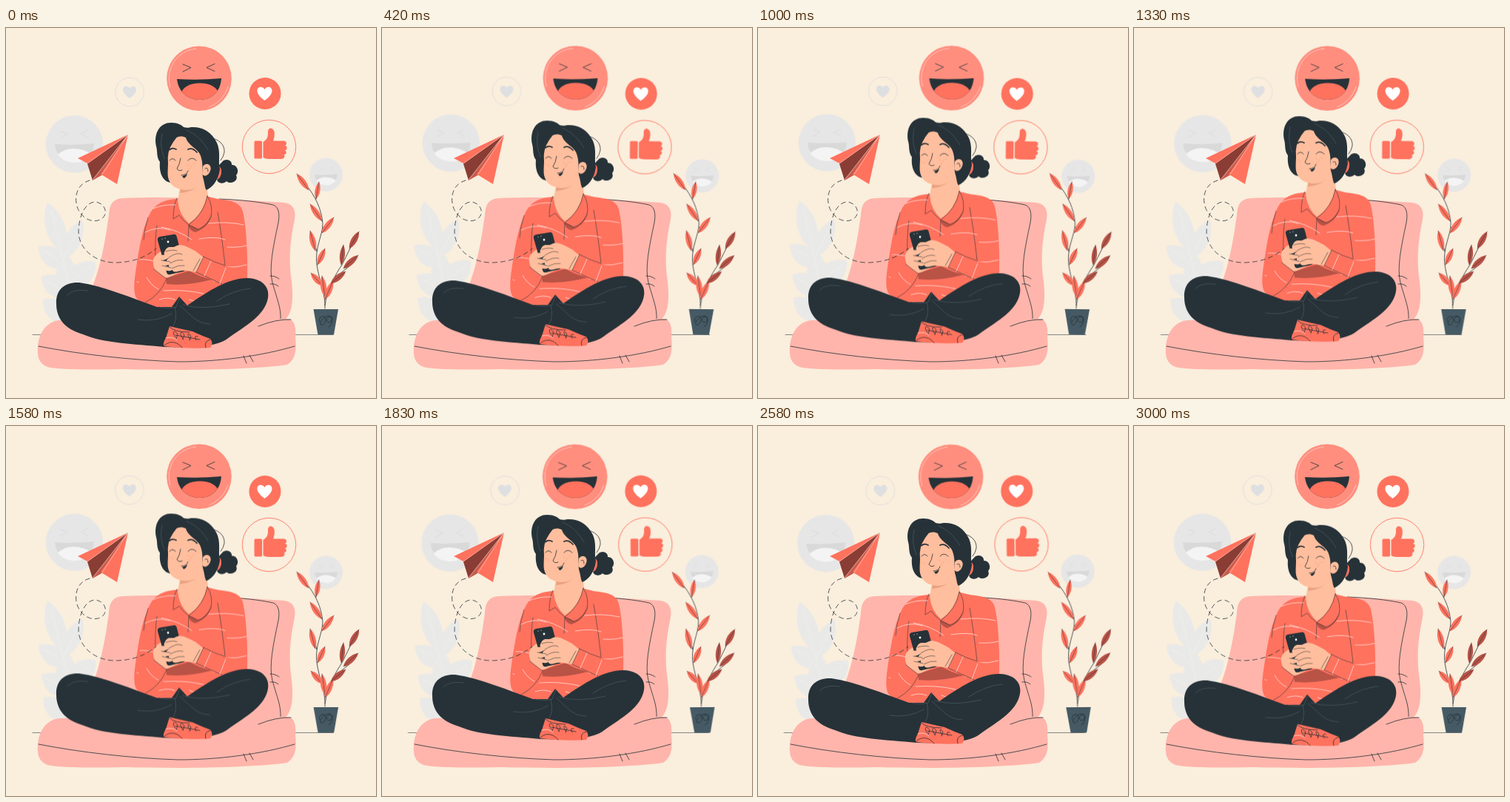
These frames come from a looping animation (500 px wide and 500 px high, 3.04 s). An HTML page:

```html
<!DOCTYPE html>
<html lang="en">
<head>
<meta charset="utf-8">
<title>Chatting on the sofa</title>
<style>
html, body { margin: 0; width: 100%; height: 100%; overflow: hidden; background: #faeedd; }
svg { display: block; width: 100vw; height: 100vh; }
.wind { animation: wind 3040ms linear infinite; }
#backdrop { transform-origin: 252px 230px; }
#reactions { transform-origin: 304px 111px; }
#plant { transform-origin: 434px 306px; }
#person { animation: float 3040ms linear infinite; }
#floor { animation: slide 3040ms linear infinite; }
@keyframes wind { 25% { transform: rotate(1deg); } 75% { transform: rotate(-1deg); } }
@keyframes float { 50% { transform: translateY(-10px); } }
@keyframes slide { 25% { transform: translateX(1.5px); } 75% { transform: translateX(-1.5px); } }
.ink { fill: none; stroke: #263238; stroke-width: .8; stroke-linecap: round; stroke-linejoin: round; }
.thin { stroke-width: .55; }
.stripe { fill: none; stroke: #ffd3cb; stroke-width: .9; stroke-linecap: round; }
.seam { fill: none; stroke: #52626a; stroke-width: .6; stroke-linecap: round; }
.coral { fill: #ff725e; }
.dark { fill: #263238; }
.skin { fill: #ffbe9d; }
</style>
</head>
<body>
<svg viewBox="0 0 500 500">
  <defs>
    <path id="heart" d="M0 9C-4 6-10 1-10-4C-10-10-3-11 0-6C3-11 10-10 10-4C10 1 4 6 0 9Z"/>
    <clipPath id="grin"><path d="M231 69Q261 71 291 68C290 86 278 97 262 97C245 97 233 86 231 69Z"/></clipPath>
  </defs>

  <g id="backdrop" class="wind">
    <g id="grayLeaves" fill="#e9e9e8"></g>
    <path d="M61 246Q70 280 77 312T94 388M99 270Q88 290 78 312M51 302Q70 309 79 325M114 323Q93 337 84 350M54 341Q74 350 87 367" fill="none" stroke="#f3f1ed" stroke-width=".7"/>
    <circle cx="167" cy="86.5" r="19.3" fill="none" stroke="#dedfde" stroke-width=".9"/>
    <use href="#heart" transform="translate(167 87) scale(.9)" fill="#dedfe0"/>
    <g id="grayFace">
      <circle cx="92.5" cy="157" r="38.7" fill="#e6e6e6"/>
      <path d="M66 157Q92 159 119 156C118 173 106 182 93 182C78 182 68 172 66 157Z" fill="#d9d9d9"/>
      <path d="M70 171Q80 162 93 163T115 170C110 178 102 182 93 182C83 182 75 178 70 171Z" fill="#f4f4f4"/>
      <path d="M73 139L83 143L73 149M111 138L101 143L111 148" fill="none" stroke="#d8d8d8" stroke-width=".8"/>
    </g>
    <use href="#grayFace" transform="translate(378.7 106.7) scale(.582)"/>
  </g>

  <path id="floor" class="ink thin" d="M36 414.5H442"/>

  <g id="plant" class="wind">
    <path class="ink" d="M431 379C432 360 424 345 420 320C417 296 428 281 428 264C426 243 418 228 405 211M431 375C434 352 446 332 454 320C461 306 468 292 474 279M443 341Q452 330 464 322M421 319L427 307M428 270L437 263M427 260L416 247M419 231L422 216M420 302L416 287M431 365L437 354M426 348L418 338"/>
    <g id="redLeaves"></g>
    <path d="M415.500 380H449L443 414.500H421.500Z" fill="#455a64"/>
    <path class="ink" d="M424 397C421 389 432 387 432 394C431 403 423 403 425 398C428 391 436 386 440 391C442 398 435 400 433 395C433 390 440 388 441 393Q441 401 436 404"/>
  </g>

  <g id="reactions" class="wind">
    <circle cx="261" cy="68.300" r="43.800" fill="#ff8e7e"/>
    <path d="M222 80C215 54 231 31 257 28M300 79C296 93 285 103 274 107" fill="none" stroke="#ffd0c7" stroke-width=".8"/>
    <g clip-path="url(#grin)">
      <path class="dark" d="M225 60H298V100H225Z"/>
      <ellipse class="coral" cx="262" cy="89" rx="25" ry="14.500"/>
    </g>
    <path class="ink" d="M239 49L250 53.500L239 59M282 48.500L271 53.500L282 58.500"/>
    <circle class="coral" cx="350" cy="88.500" r="21.500"/>
    <use href="#heart" transform="translate(349.500 89)" fill="#fff"/>
    <circle cx="355.500" cy="160.500" r="36.200" fill="none" stroke="#ff725e" stroke-width=".9"/>
    <path class="coral" d="M337 152.500H344.500Q346 152.500 346 154V175Q346 176.500 344.500 176.500H337Q335.500 176.500 335.500 175V154Q335.500 152.500 337 152.500ZM347.500 154C354 150 354 146 354 140C354 134 361 134 362.500 140C363.500 145 362 150 361 152.500H375C380 152.500 380 158 377 159C381 160 380 165 377 165.500C380 167 379 171 375.500 171.500C378 174 375 177 372 177H355Q350 177 347.500 175Z"/>
  </g>

  <g id="sofa">
    <path fill="#ffb5ab" d="M116 352C128 322 134 289 139 253C140 237 145 231 158 230C220 227 305 231 376 236C389 238 392 247 390 259C383 291 382 316 386 343C389 371 386 389 374 397H110Z"/>
    <path class="ink" d="M288 231C316 232 343 235 361 239C369 242 370 252 368 263C361 296 355 324 360 344C366 366 372 378 371 394M357 335Q364 335 369 339M357 346Q364 345 368 349"/>
    <path fill="#ffb5ab" d="M43 430C45 412 54 397 72 395Q200 389 382 393C390 395 392 404 391 418C393 436 391 448 380 455C330 462 240 463 160 461C112 462 73 462 56 458C44 453 42 444 43 430Z"/>
    <path class="ink" d="M44 430C100 441 169 449 233 451C289 451 346 443 390 430M321 443L325 453M329 442L334 451M341 403Q366 393 385 394"/>
  </g>

  <g id="plane">
    <path class="coral" d="M165 144L97 176L112 184Z"/>
    <path fill="#8a3d34" d="M165 144L110 183.500L117 206Z"/>
    <path fill="#c95a4b" d="M165 144L117 206L131 198Z"/>
    <path class="coral" d="M165 144L128 197.500L150 211Z"/>
    <path d="M165 144L110 183M165 144L117 205M165 144L130 198" fill="none" stroke="#ffd0c7" stroke-width=".6"/>
  </g>

  <g id="person">
    <path class="dark" d="M292 181C297 175 306 179 305 185C312 184 316 194 311 199C315 207 303 212 298 207C292 213 282 208 286 201C282 197 284 188 292 181Z"/>
    <path class="ink" d="M275 148C288 150 296 158 295 168Q294 174 290 179"/>
    <path class="coral" d="M286 187Q292 187 291 196Q290 203 285 205Z"/>
    <path class="dark" d="M203 160C199 141 209 127 224 128C232 128 238 131 242 136C257 131 273 136 282 150C292 164 286 180 289 190C288 203 280 216 270 219C262 214 255 206 222 209C209 206 207 191 208 181C203 175 205 166 203 160Z"/>

    <path class="coral" d="M229 231C210 233 200 239 193 254C184 274 181 292 177 317C174 337 170 359 178 367C185 374 193 374 200 378H290L326 342C327 310 325 269 320 248C317 235 303 233 286 231L270 227Z"/>
    <path class="skin" d="M236 210L232 234Q234 252 247 264Q266 252 273 232L271 196Z"/>
    <path d="M236 217Q254 216 265 205Q257 221 235 223Z" fill="#eaa181"/>
    <path class="skin" d="M218 164C219 154 227 147 238 146C253 149 265 165 269 185L267 205C259 218 246 221 236 218C222 215 218 205 218 191Z"/>
    <path class="dark" d="M221 150C228 145 237 145 243 148C246 160 262 163 264 176C267 186 264 197 267 205C269 214 269 217 271 219C285 210 286 190 280 165C272 140 246 129 222 136ZM216 154Q223 148 232 146L226 154Q217 167 219 183L218 208Q208 199 208 181Z"/>
    <path class="skin" d="M266 187C271 180 279 185 276 193C273 201 267 201 265 197Z"/>
    <path d="M221 164.500Q225 161 230 164M246 164Q252 161 258 168" fill="none" stroke="#263238" stroke-width="1.700" stroke-linecap="round"/>
    <path class="ink" d="M221 179Q225 174 229 179M246 179Q251 173 257 179M236 176Q235 184 231 190Q233 194 238 192M237 199Q244 199 246 193M269 190Q273 187 273 194"/>
    <path class="dark" d="M238 200Q243 199 245 196Q244 202 240 203Z"/>
    <g fill="#f38c6c">
      <circle cx="246" cy="185" r=".6"/><circle cx="250" cy="187" r=".6"/><circle cx="254" cy="184" r=".6"/>
      <circle cx="222" cy="187" r=".6"/><circle cx="225" cy="189" r=".6"/><circle cx="248" cy="190" r=".6"/>
    </g>
    <path class="seam" d="M244 138C257 144 265 151 273 165M211 143Q207 160 214 177"/>

    <path fill="#b85346" d="M246 266Q258 270 277 252Q275 269 256 276Q248 274 246 266Z"/>
    <path class="coral" d="M231 230Q226 239 226 258L234 253L246 267Q233 251 232 235ZM272 225Q267 251 247 265L260 272Q277 264 279 241Z"/>
    <path class="ink thin" d="M231 230Q226 240 226 258L234 253Q239 260 247 266Q268 250 272 227Q280 239 277 256Q270 269 259 272L247 266L246 288M204 267Q201 286 202 313M286 249Q291 276 296 320M192 256Q187 271 186 286"/>
    <path class="stripe" d="M199 244Q213 238 229 239M188 276Q205 267 222 273M181 313Q190 312 204 316M177 343Q189 349 201 345M210 269Q233 273 251 286M274 264Q299 261 321 266M261 285Q284 281 296 286M299 296Q314 297 325 294M298 323Q312 324 325 320M280 342Q297 338 313 338M213 355Q242 353 267 359M207 367Q218 363 228 367M248 367L269 374"/>
    <path fill="#b85346" d="M216 338L248 328Q258 335 278 340Q243 349 217 346Z"/>

    <path class="skin" d="M199 319C197 309 205 304 213 300L234 300L241 327L224 335C213 342 201 333 199 319Z"/>
    <path class="dark" d="M208 282L226 279Q230 278 231 283L242 325Q243 328 239 329L222 333Q218 334 217 330L205 287Q204 283 208 282Z"/>
    <g fill="#fff"><circle cx="219" cy="289" r="1.400"/><circle cx="211" cy="285" r=".6"/><circle cx="215" cy="284" r=".6"/></g>
    <path class="skin" d="M215 301C219 293 224 298 229 295C237 290 247 297 257 302L268 311L259 330C248 329 242 326 232 329C226 331 223 327 226 324C220 326 218 321 222 318C216 319 215 314 220 311C214 309 212 305 215 301Z"/>
    <path class="skin" d="M200 314Q211 302 219 309Q221 312 211 314L224 316Q226 320 215 321L226 325Q225 330 212 327L204 328Z"/>
    <path class="ink thin" d="M220 310Q232 302 238 306M222 318Q231 312 239 314M226 324Q233 320 241 321M216 302Q225 299 231 301M210 314L222 316M211 321L223 324"/>
    <path class="coral" d="M267 309C282 317 297 323 316 326L325 338Q311 354 288 345L257 330Z"/>
    <path class="coral" d="M200 326L217 339Q209 361 188 372Q174 368 175 349Q184 337 200 326Z"/>
    <path class="ink thin" d="M267 309L257 330L292 346M267 309Q282 317 296 321M200 326L217 339Q208 361 188 371M262 312L253 328"/>
    <path class="stripe" d="M277 315L268 335M297 324L289 345M190 337Q196 348 206 353"/>

    <path class="dark" d="M68 373C67 352 81 343 99 344C133 349 170 365 204 377H224L234 363L245 375C275 354 303 337 327 338C350 339 358 354 353 369C346 392 319 405 299 420C282 432 246 432 214 431C172 427 132 426 104 414C80 407 68 393 68 373Z"/>
    <path class="seam" d="M207 377Q218 380 230 377L235 364M235 375C253 390 256 399 276 400M239 374Q264 382 302 373M224 386Q203 398 178 394M110 355Q91 352 83 361M228 377Q232 393 226 403M330 352Q307 354 285 369"/>
    <path class="coral" d="M221 403Q238 407 252 410Q265 416 276 420Q281 426 276 432Q245 434 213 430Q212 425 216 419Z"/>
    <path class="ink" d="M213 430C220 422 231 423 238 432M221 404Q227 411 248 411M276 421Q267 423 270 432M229 418C223 410 228 407 232 414L230 420M239 420C232 410 238 409 241 415L239 421M249 421C243 412 247 411 250 417L248 422M257 422Q253 415 259 417M229 415L262 421"/>
    <path class="stripe" d="M216 419Q225 416 231 422"/>
  </g>

  <path class="ink" stroke-dasharray="6 5" d="M113 206C98 210 93 224 95 237C98 255 116 266 129 258C139 251 134 237 121 235C106 235 98 257 98 276C99 300 122 318 150 317C173 316 188 310 203 298"/>
</svg>
<script>
// Each leaf: base x, base y, tip x, tip y, half width
function leafPath([x1, y1, x2, y2, w]) {
  const dx = x2 - x1, dy = y2 - y1, len = Math.hypot(dx, dy);
  const nx = -dy / len * w * 1.33, ny = dx / len * w * 1.33;
  const at = (t, s) => `${x1 + dx * t + nx * s} ${y1 + dy * t + ny * s}`;
  return `M${x1} ${y1}C${at(.25, 1)} ${at(.72, 1)} ${x2} ${y2}C${at(.72, -1)} ${at(.25, -1)} ${x1} ${y1}Z`;
}

function addLeaves(id, leaves, fill, vein) {
  document.getElementById(id).innerHTML += leaves.map(leaf => {
    const [x1, y1, x2, y2] = leaf;
    const line = vein ? `<path class="ink thin" d="M${x1} ${y1}L${x2} ${y2}"/>` : '';
    return `<path d="${leafPath(leaf)}" fill="${fill}"/>${line}`;
  }).join('');
}

addLeaves('grayLeaves', [
  [78, 305, 56, 236, 13], [78, 312, 103, 260, 11], [83, 324, 44, 296, 13],
  [82, 350, 121, 316, 15], [88, 362, 48, 336, 14], [88, 397, 50, 367, 14],
  [86, 395, 79, 300, 16]
], '#e9e9e8');

addLeaves('redLeaves', [
  [409, 219, 393, 197, 4], [419, 231, 423, 208, 3.5], [427, 261, 411, 238, 4],
  [427, 277, 443, 256, 4], [418, 301, 411, 274, 4], [421, 320, 431, 298, 4],
  [427, 348, 412, 331, 4], [431, 363, 427, 335, 4], [431, 367, 442, 342, 4]
], '#ff725e', true);

addLeaves('redLeaves', [
  [464, 298, 477, 275, 4], [453, 320, 456, 293, 3.5],
  [456, 325, 476, 307, 4], [439, 345, 459, 329, 4]
], '#b95246', true);
</script>
</body>
</html>
```
